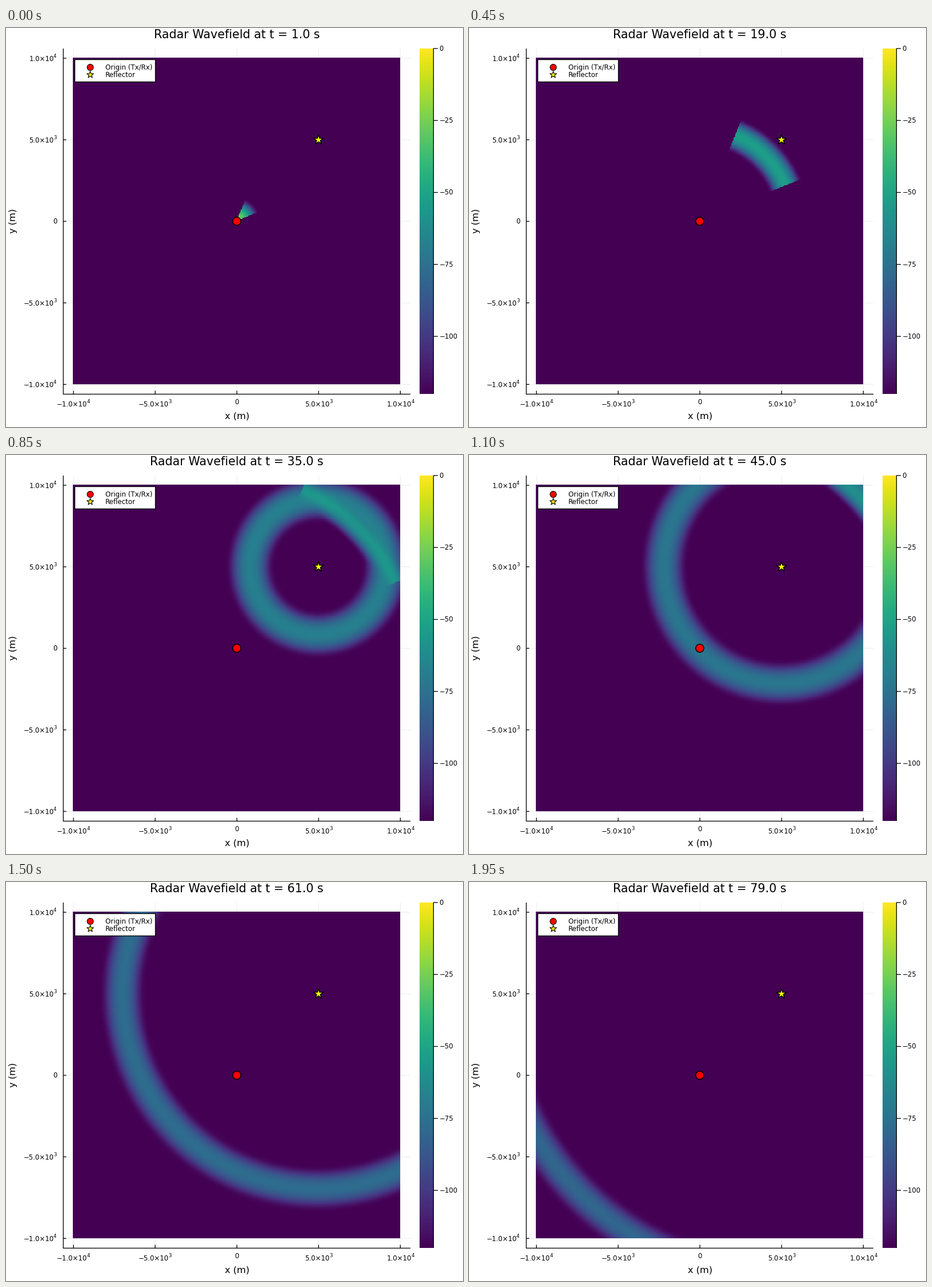
These frames come from a looping animation (800x700 px, 2000 ms). A matplotlib script:

```python
import numpy as np
import matplotlib.pyplot as plt
from matplotlib.animation import FuncAnimation
from matplotlib.patches import Circle, Polygon, Rectangle

W, H, DPI = 800, 700, 100
FRAMES, INTERVAL = 40, 50
PX = 72 / DPI
STROKE = 1.3

SPEED = 300.0
TARGET = (5000.0, 5000.0)
ECHO_START = 21.0
BEAM = np.pi / 8
FLOOR = 1e-6

plt.rcParams["font.family"] = "DejaVu Sans"
fig = plt.figure(figsize=(W / DPI, H / DPI), dpi=DPI, facecolor="white")
ax = fig.add_axes([0, 0, 1, 1])
ax.set_axis_off()


def text(x, y, s, size=11.8, ha="center", **kw):
    return ax.text(x, y, s, fontsize=size * PX, ha=ha,
                   va=kw.pop("va", "baseline"), zorder=6, **kw)


def line(x0, y0, x1, y1, color="black", z=1):
    ax.plot([x0, x1], [y0, y1], color=color, lw=STROKE * PX, zorder=z,
            solid_capstyle="butt", snap=False)


def dot(x, y, r, edge):
    ax.add_patch(Circle((x, y), r, fc="red", ec="black", lw=edge * PX, zorder=5))


def star(x, y, r, edge):
    a = -np.pi / 2 + np.arange(10) * np.pi / 5
    rad = np.where(np.arange(10) % 2, 0.382 * r, r)
    pts = np.column_stack([x + rad * np.cos(a), y + rad * np.sin(a)])
    ax.add_patch(Polygon(pts, fc="yellow", ec="black", lw=edge * PX,
                         joinstyle="miter", zorder=5))


# Wave field sampled every 50 m
axis = np.linspace(-10000, 10000, 401)
X, Y = np.meshgrid(axis, axis[::-1])
R = np.hypot(X, Y)
R_ECHO = np.hypot(X - TARGET[0], Y - TARGET[1])
IN_BEAM = np.abs(np.arctan2(Y, X) - np.pi / 4) <= BEAM


def pulse(r, centre, sigma, gain):
    """Gaussian shell with spherical spreading loss."""
    return gain * np.exp(-((r - centre) / sigma) ** 2 / 2) / np.maximum(r, 50)


def field(t):
    amp = IN_BEAM * pulse(R, SPEED * t, 240, 13)
    if t >= ECHO_START:
        amp = amp + pulse(R_ECHO, SPEED * (t - ECHO_START), 360, 1.65)
    return 20 * np.log10(amp + FLOOR)


def power_label(x, y, base, exp):
    """Number with a raised exponent; x is the right end of the base."""
    text(x, y, base, ha="right")
    text(x - 0.6, y - 6, exp, 8.6, ha="left")


# Grid, axes and tick labels
TICKS = [(-2, "\u22121.0×10", "4"), (-1, "\u22125.0×10", "3"), (0, "0", ""),
         (1, "5.0×10", "3"), (2, "1.0×10", "4")]
for k, base, exp in TICKS:
    x, y = 404.2 + 143.05 * k, 339.2 - 143.05 * k
    line(x, 36, x, 642, "#f0f0f0")
    line(100, y, 708, y, "#f0f0f0")
    line(x, 642, x, 636.5)
    line(100, y, 105.5, y)
    if exp:
        power_label(x + (24 if k < 0 else 19.5), 664, base, exp)
        power_label(83.6, y + 4.8, base, exp)
    else:
        text(x, 660, base)
        text(89.3, y + 4, base, ha="right")
line(100.3, 36, 100.3, 643)
line(100, 642.4, 708, 642.4)
text(404.5, 686, "x (m)", 16.3)
text(20.5, 338.5, "y (m)", 16.3, rotation=90, va="center", ha="right")
title = text(404, 18, "", 20.7)

# Colour bar
ax.imshow(np.linspace(0, -120, 606)[:, None], cmap="viridis", vmin=-120, vmax=0,
          extent=(724, 748, 642, 36), aspect="auto", zorder=2)
line(748.4, 36, 748.4, 642, z=3)
for v in range(0, -101, -25):
    y = 36 - v * 5.05
    line(748, y, 756, y, z=3)
    text(758.3, y + 4, str(v).replace("-", "\u2212"), ha="left")

wave = ax.imshow(field(1), cmap="viridis", vmin=-120, vmax=0, aspect="auto",
                 interpolation="nearest", extent=(117, 690, 625, 52), zorder=2)

dot(404, 339, 7.1, 1.5)
star(547, 196.3, 9.2, 1.6)

# Legend
ax.add_patch(Rectangle((120.5, 55.5), 141, 39, fc="white", ec="black",
                       lw=STROKE * PX, snap=False, zorder=4))
dot(147.5, 69, 5.5, 1.1)
star(147.5, 82, 6.4, 1.1)
text(173.5, 73, "Origin (Tx/Rx)", ha="left")
text(173.5, 86, "Reflector", ha="left")

ax.set_xlim(0, W)
ax.set_ylim(H, 0)


def update(i):
    t = 1.0 + 2.0 * i
    wave.set_data(field(t))
    title.set_text(f"Radar Wavefield at t = {t:.1f} s")
    return wave, title


anim = FuncAnimation(fig, update, frames=FRAMES, interval=INTERVAL,
                     repeat=True, repeat_delay=0, blit=False)
plt.show()
```
